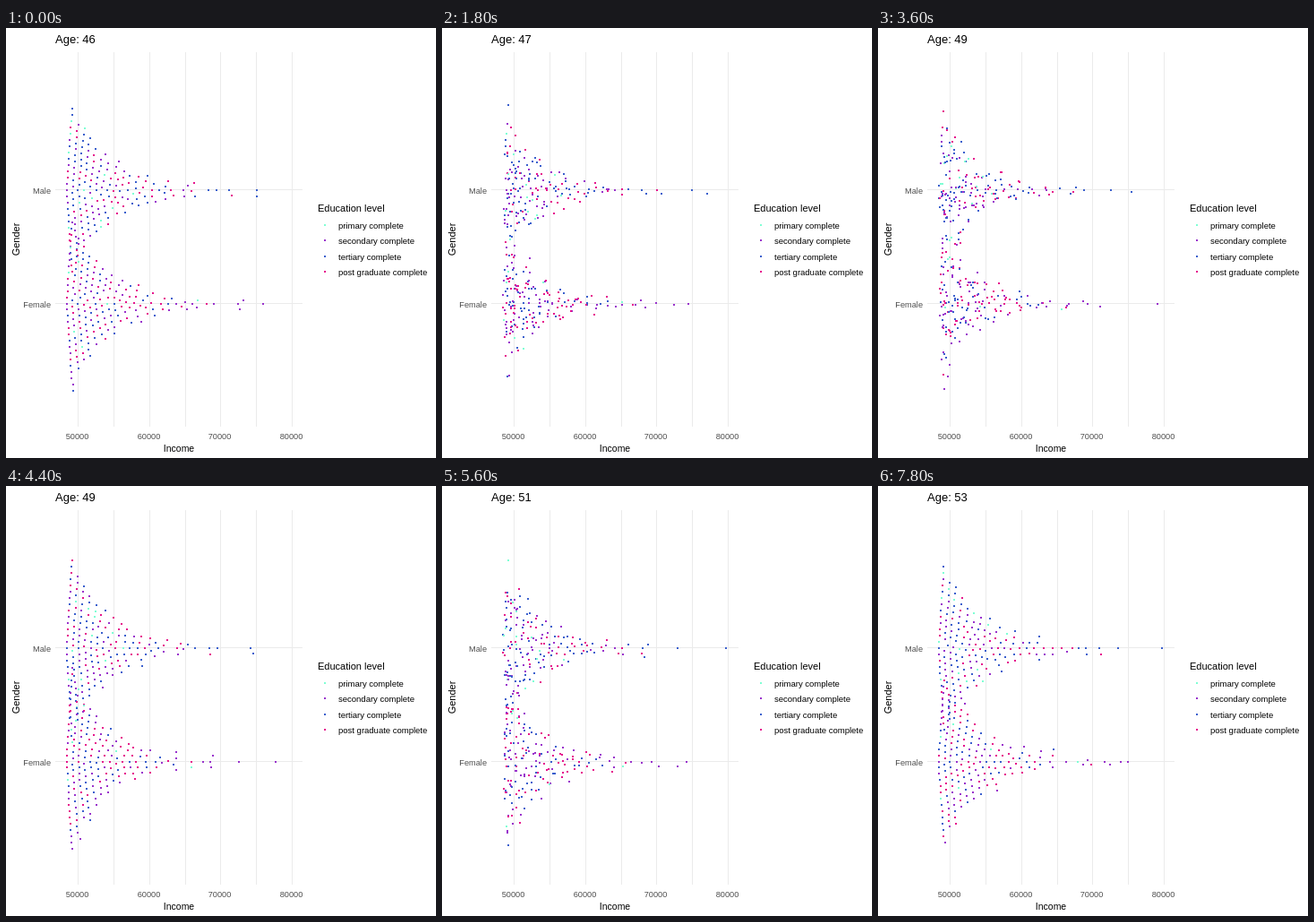
An HTML page with a canvas for the animation above (8 s loop, 480 by 480 pixels).

```html
<!DOCTYPE html>
<html lang="en">
<head>
<meta charset="utf-8">
<title>Income by gender and age</title>
<style>
  html, body { margin: 0; width: 100%; height: 100%; overflow: hidden; background: #fff; }
  svg, canvas { position: absolute; left: 0; top: 0; width: 480px; height: 480px; }
  text { font-family: "Liberation Sans", Arial, sans-serif; font-size: 11px; }
  .tick { font-size: 9.2px; fill: #4d4d4d; }
  .key { font-size: 9.5px; }
  .mid { text-anchor: middle; }
  .end { text-anchor: end; }
</style>
</head>
<body>
<svg id="chart" viewBox="0 0 480 480">
  <g id="grid" stroke="#ebebeb"></g>
  <text id="age" x="55" y="17" style="font-size:13px">Age: 46</text>
  <text class="tick end" x="50" y="185">Male</text>
  <text class="tick end" x="50" y="312">Female</text>
  <text class="mid" x="193" y="473" style="font-size:10.5px">Income</text>
  <text class="mid" transform="translate(15 236) rotate(-90)">Gender</text>
  <text x="348" y="205">Education level</text>
</svg>
<canvas id="dots" width="480" height="480"></canvas>
<script>
const STEP = 200, STEPS = 40, FIRST_AGE = 46, YEARS = 7;
const STEPS_PER_YEAR = (STEPS - 1) / YEARS;
const AXES = [181, 307.5];
const DOTS = 185, SPACING = 7, LEFT = 67.5, RIGHT = 317;
// Name, colour, cumulative share.
const LEVELS = [
  ['primary complete', '#7fffd4', .06],
  ['secondary complete', '#9932cc', .36],
  ['tertiary complete', '#3a5fcd', .68],
  ['post graduate complete', '#e6128c', 1]
];

function randomFrom(seed) {
  return () => {
    seed = (seed + 0x6d2b79f5) | 0;
    let t = Math.imul(seed ^ (seed >>> 15), 1 | seed);
    t = (t + Math.imul(t ^ (t >>> 7), 61 | t)) ^ t;
    return ((t ^ (t >>> 14)) >>> 0) / 4294967296;
  };
}

// Incomes thin out roughly exponentially; the middle years are more crowded.
function incomes(year, rand) {
  const scale = 44 - 4 * Math.sin(Math.PI * year / YEARS);
  return Array.from({ length: DOTS }, (_, i) => {
    const e = -Math.log(1 - (i + 3 * rand()) / (DOTS + 3));
    return Math.min(LEFT + scale * (.93 * e + .06 * e * e), RIGHT);
  }).sort((a, b) => a - b);
}

// Beeswarm: each dot takes the free place nearest to its axis.
function swarm(year, gender) {
  const rand = randomFrom(year * 10 + gender + 1);
  const placed = [];
  for (const x of incomes(year, rand)) {
    const near = placed.filter(p => x - p.x < SPACING);
    const places = [0];
    for (const p of near) {
      const dy = Math.sqrt(SPACING ** 2 - (x - p.x) ** 2);
      places.push(p.y + dy, p.y - dy);
    }
    places.sort((a, b) => Math.abs(a) - Math.abs(b));
    const y = places.find(c =>
      near.every(p => (x - p.x) ** 2 + (c - p.y) ** 2 > SPACING ** 2 - .01));
    placed.push({ x, y, order: x - .3 * Math.abs(y) + 20 * (rand() - .5) });
  }
  // Dots of equal rank belong together from year to year.
  return placed.sort((a, b) => a.order - b.order);
}

const swarms = AXES.map((_, gender) =>
  Array.from({ length: YEARS + 1 }, (_, year) => swarm(year, gender)));
const colorRand = randomFrom(77);
const colors = AXES.map(() => Array.from({ length: DOTS }, () => {
  const r = colorRand();
  return LEVELS.find(level => r <= level[2])[1];
}));

const chart = document.getElementById('chart');
const grid = document.getElementById('grid');
const ageLabel = document.getElementById('age');
const ctx = document.getElementById('dots').getContext('2d');

function svg(parent, tag, attrs, text = '') {
  const node = document.createElementNS(chart.namespaceURI, tag);
  for (const name in attrs) node.setAttribute(name, attrs[name]);
  node.textContent = text;
  parent.append(node);
}

for (let i = 0; i < 7; i++) {
  const x = Math.round(80 + i * 39.85) + .5;
  svg(grid, 'line', { x1: x, x2: x, y1: 27, y2: 445 });
  if (i % 2 === 0) svg(chart, 'text', { x: x - 1, y: 459, class: 'tick mid' }, 50000 + i * 5000);
}
for (const y of [180.5, 307.5]) svg(grid, 'line', { x1: 55, x2: 331, y1: y, y2: y });
LEVELS.forEach(([name, color], i) => {
  const y = Math.round(220 + i * 17.3);
  svg(chart, 'rect', { x: 355, y: y - 1, width: 2, height: 2, fill: color });
  svg(chart, 'text', { x: 371, y: y + 4, class: 'key' }, name);
});

const yearStart = year => Math.floor(year * STEPS_PER_YEAR + 1e-6);

function draw(step) {
  let year = 0;
  while (year < YEARS && yearStart(year + 1) <= step) year++;
  const next = Math.min(year + 1, YEARS);
  const start = yearStart(year);
  const mix = next > year ? (step - start) / (yearStart(next) - start) : 0;

  ageLabel.textContent = 'Age: ' + Math.floor(FIRST_AGE + step / STEPS_PER_YEAR + 1e-6);
  ctx.clearRect(0, 0, 480, 480);
  swarms.forEach((years, gender) => {
    years[year].forEach((a, i) => {
      const b = years[next][i];
      const x = a.x + (b.x - a.x) * mix;
      const y = AXES[gender] + a.y + (b.y - a.y) * mix;
      ctx.fillStyle = colors[gender][i];
      ctx.fillRect(Math.round(x - 1), Math.round(y - 1), 2, 2);
    });
  });
}

let shown = -1;
function tick() {
  const step = Math.floor(performance.now() / STEP) % STEPS;
  if (step !== shown) draw(shown = step);
  requestAnimationFrame(tick);
}
tick();
</script>
</body>
</html>
```
